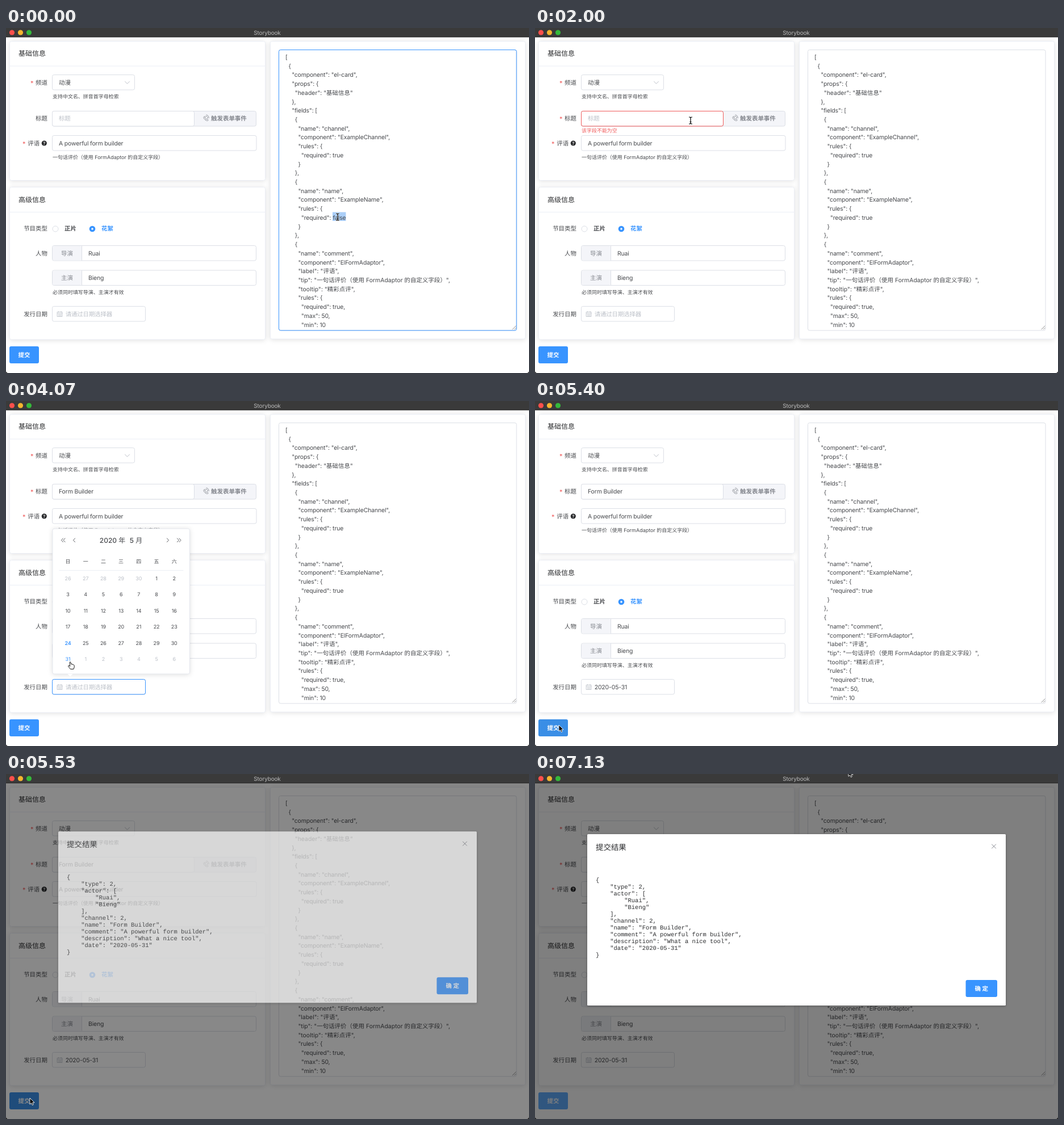
Write an HTML page that moves like this. It is 921 px wide and 608 px high and loops after 7190 ms.

```html
<!DOCTYPE html>
<html lang="zh">
<head>
<meta charset="utf-8">
<title>Storybook</title>
<style>
html, body { margin: 0; height: 100%; overflow: hidden; background: #fff; }
svg { display: block; width: 100vw; height: 100vh; }
text { font-family: Inter, "Noto Sans CJK SC", "Noto Sans CJK", sans-serif; letter-spacing: -.015em; white-space: pre; text-rendering: geometricPrecision; }
.han { letter-spacing: 0; }
.mono text { font-family: "Liberation Mono", monospace; letter-spacing: 0; }
.card { filter: drop-shadow(0 1.5px 4.5px rgba(0, 0, 0, .12)); }
.box { filter: drop-shadow(0 1px 2px rgba(0, 0, 0, .3)); }
.line { fill: none; stroke-linecap: round; stroke-linejoin: round; }
</style>
</head>
<body>
<svg id="stage" viewBox="0 0 921 608"></svg>
<script>
const LOOP = 7190;
const BLUE = '#3894ff', RED = '#f05b5b', INK = '#484a4e', DARK = '#2a2b2d',
      PALE = '#bcc0c8', MUTE = '#85888f', EDGE = '#dcdfe6', TINT = '#f4f5f9';

// Markup helpers; text is placed by its vertical middle.
const rect = (x, y, w, h, fill, stroke = 'none', r = 3, more = '') =>
  `<rect x="${x}" y="${y}" width="${w}" height="${h}" rx="${r}" fill="${fill}" stroke="${stroke}" ${more}/>`;
const text = (x, y, str, fill = INK, size = 10.48, more = '') =>
  `<text x="${x}" y="${y + size * .36}" font-size="${size}" fill="${fill}" ${/[\u4e00-\u9fff]/.test(str) ? 'class="han"' : ''} ${more}>${str}</text>`;
const path = (d, stroke, width = 1, more = '') =>
  `<path class="line" d="${d}" stroke="${stroke}" stroke-width="${width}" ${more}/>`;
const dot = (x, y, r, fill, stroke = 'none') =>
  `<circle cx="${x}" cy="${y}" r="${r}" fill="${fill}" stroke="${stroke}"/>`;
const group = (id, body) => `<g id="${id}">${body}</g>`;
const MID = ' text-anchor="middle"', END = ' text-anchor="end"', BOLD = ' font-weight="600"', MEDIUM = ' font-weight="500"';
const label = (y, str, x = 73) => text(x, y, str, INK, 10.48, END);
const star = (x, y) => text(x, y + 1, '*', RED, 11);
const hint = (y, str) => text(82, y, str, INK, 8.98);
const heading = (y, str) => text(22, y, str, DARK, 12, MEDIUM);
const card = (x, y, w, h) => rect(x, y, w, h, '#fff', '#ebeef5', 3, 'class="card"');
const input = (x, y, w, h = 26.5) => rect(x, y, w, h, '#fff', EDGE);
const ring = (id, x, y, w, h, color) => rect(x, y, w, h, 'none', color, 3, `id="${id}"`);

function titleBar() {
  return rect(0, 0, 921, 16, '#3a3a3a', 'none', 0) + rect(0, 15.4, 921, 1, '#222', 'none', 0) +
    ['#fc4f4b', '#f6b52e', '#35b93b'].map((c, i) => dot(10.5 + 15 * i, 8, 4.6, c)).join('') +
    text(460, 8.3, 'Storybook', '#b9b9b9', 10, MID);
}

function basicCard() {
  return card(6.5, 23.5, 450, 245) + path('M7 67H456', '#ebeef5') + heading(45, '基础信息') +
    star(43, 96) + label(96, '频道') + input(81.5, 82.5, 145) + text(93, 96, '动漫') +
    path('M209.5 94.2l4 4l4-4', PALE) + hint(121, '支持中文名、拼音首字母检索') +
    label(159.5, '标题') + rect(81.5, 146.5, 359, 26.5, TINT, EDGE) + input(81.5, 146.5, 250) +
    path('M349 156c-2 1-1 4 2 6c3 2 5 2 5 0l-2-2l-1.5 1l-2.5-3l1-1zM352 155c2 .5 3 2 3.2 4M353 153c3 .8 4 3 4.2 5.5', MUTE, .9) +
    text(361, 159.5, '触发表单事件', MUTE, 10.48, BOLD) +
    star(29, 203) + label(203, '评语', 59.3) + dot(67.3, 203, 4.6, DARK) +
    text(67.3, 203.2, '?', '#fff', 7.5, MID + BOLD) +
    input(81.5, 189.5, 359.5) + text(93, 203, 'A powerful form builder') +
    hint(228, '一句话评价（使用 FormAdaptor 的自定义字段）') +
    text(93, 159.5, '', INK, 10.48, 'id="name"') + group('star', star(43, 159.5)) +
    ring('nameRing', 81.5, 146.5, 250, 26.5, RED) +
    group('error', text(82, 180.5, '该字段不能为空', RED, 8.98));
}

function person(y, role, name) {
  return rect(81.5, y - 13.5, 359, 26.5, '#fff', EDGE) + rect(82, y - 13, 51, 25.5, TINT) +
    path(`M133.5 ${y - 13}v25.5`, EDGE) + text(97, y, role, MUTE) + text(145, y, name);
}

function advancedCard() {
  return card(6.5, 280.5, 450, 268.5) + path('M7 324.5H456', '#ebeef5') + heading(302.5, '高级信息') +
    label(353.5, '节目类型') + dot(87, 354, 5, '#fff', EDGE) + text(103, 353.5, '正片', INK, 10.48, BOLD) +
    dot(152, 354, 5.3, BLUE) + dot(152, 354, 1.7, '#fff') + text(168, 353.5, '花絮', BLUE, 10.48, BOLD) +
    label(397, '人物') + person(397, '导演', 'Ruai') + person(440.5, '主演', 'Bieng') +
    hint(465.5, '必须同时填写导演、主演才有效') +
    label(504, '发行日期') + input(81.5, 490.5, 164) +
    path('M90.5 500.5h8.5v8h-8.5zM90.5 503h8.5M92.5 499.5v1.5M97 499.5v1.5M92 505h5.5M92 507h5.5', PALE, .8) +
    text(104.7, 504, '', INK, 10.48, 'id="date"') + ring('dateRing', 81.5, 490.5, 164, 26.5, BLUE);
}

function codeCard() {
  const spec = [{
    component: 'el-card', props: { header: '基础信息' },
    fields: [
      { name: 'channel', component: 'ExampleChannel', rules: { required: true } },
      { name: 'name', component: 'ExampleName', rules: { required: '' } },
      { name: 'comment', component: 'ElFormAdaptor', label: '评语',
        tip: '一句话评价（使用 FormAdaptor 的自定义字段）', tooltip: '精彩点评',
        rules: { required: true, max: 50, min: 10 } }
    ]
  }];
  const lines = JSON.stringify(spec, null, 1).split('\n').slice(0, 31);
  const code = lines.map((line, i) => {
    const body = line.trimStart();
    return text(492 + 5.6 * (line.length - body.length), 51.2 + 15.72 * i, body.replace(' ""', ''));
  });
  return card(465.5, 23.5, 449, 524.5) + input(480.5, 38.5, 418.5, 494.5) +
    ring('codeRing', 480.5, 38.5, 418.5, 494.5, BLUE) +
    rect(575, 324.5, 23.5, 15.5, '#abcff8', 'none', 0, 'id="mark"') + code.join('') +
    text(575.5, 334.2, '', INK, 10.48, 'id="value"') + path('M892 531l6-6M895.5 531l2.5-2.5', '#777', .8);
}

function calendar() {
  const col = i => 109 + 31.2 * i;
  let out = rect(82, 225, 241.5, 256, '#fff', '#e4e7ed', 3, 'class="card"') +
    '<path d="M108.5 481h9l-4.5 4.5z" fill="#fff"/>' +
    path('M100.5 242l-3 3.3l3 3.3M104 242l-3 3.3l3 3.3M121.5 242l-3 3.3l3 3.3M283.5 242l3 3.3l-3 3.3M301.5 242l3 3.3l-3 3.3M305 242l3 3.3l-3 3.3', '#606266') +
    text(187.5, 245.5, '2020 年', INK, 12, MID + MEDIUM) + text(229, 245.5, '5 月', INK, 12, MID + MEDIUM) +
    path('M94 298.5H312', '#ebeef5');
  [...'日一二三四五六'].forEach((d, i) => out += text(col(i), 283, d, INK, 8.98, MID));
  for (let i = 0; i < 42; i++) {
    const n = i - 4, inside = n > 0 && n < 32, day = n < 1 ? n + 30 : inside ? n : n - 31;
    const more = MID + (n === 24 ? BOLD : '') + (n === 31 ? ' id="pick"' : '');
    out += text(col(i % 7), 312.8 + 28.45 * Math.floor(i / 7), day, n === 24 ? BLUE : inside ? INK : PALE, 8.98, more);
  }
  return out;
}

function dialog() {
  const result = { type: 2, actor: ['Ruai', 'Bieng'], channel: 2, name: 'Form Builder',
    comment: 'A powerful form builder', description: 'What a nice tool', date: '2020-05-31' };
  const lines = JSON.stringify(result, null, 4).split('\n').map((s, i) => text(107, 186 + 12 * i, s, DARK));
  return rect(92, 106, 737, 302, '#fff', 'none', 1.5, 'class="box"') + text(107, 129, '提交结果', DARK, 13.46) +
    path('M804.5 124l7 7M811.5 124l-7 7', MUTE) + `<g class="mono">${lines.join('')}</g>` +
    rect(758.5, 363, 55.5, 30, BLUE) + text(786.3, 378, '确 定', '#fff', 10.48, MID + BOLD);
}

const stage = document.getElementById('stage');
stage.innerHTML = rect(0, 0, 921, 608, '#fff', 'none', 0) +
  basicCard() + advancedCard() + codeCard() +
  rect(6, 561, 52, 30, BLUE, 'none', 3, 'id="submit"') + text(32, 576, '提交', '#fff', 10.48, MID + BOLD) +
  path('', DARK, .9, 'id="caret"') + group('calendar', calendar()) +
  rect(0, 16, 921, 592, '#000', 'none', 0, 'id="mask"') + group('dialog', dialog()) + titleBar() +
  '<path d="M0 604v4h4q-4 0-4-4M921 604v4h-4q4 0 4-4"/>' +
  group('cursor',
    group('arrow', '<path d="M0 0V11.2L2.6 8.8L4.3 12.6L6.2 11.8L4.6 8.1H8.1Z" stroke="#fff" stroke-width=".9"/>') +
    group('beam', ['#fff', '#000'].map((c, i) => path('M-2.5-6Q0-6 0-4.5Q0-6 2.5-6M0-4.5V4.5M-2.5 6Q0 6 0 4.5Q0 6 2.5 6M-1 2.5h2', c, 2.2 - i)).join('')) +
    group('hand', '<path d="M-1 .5Q0-1 1 .5L1.8 4Q3 3 4 4.3Q5.3 3.8 5.8 5Q7.3 5 7.2 6.5V9L6 12.5H.5L-3.5 7.5Q-3.5 6-2 6.5L-.3 7.5Z" fill="#fff" stroke="#000" stroke-width=".9"/>'));

const el = {};
stage.querySelectorAll('[id]').forEach(e => el[e.id] = e);
const show = (e, p) => e.setAttribute('opacity', p);
const ramp = (t, a, b) => Math.min(1, Math.max(0, (t - a) / (b - a)));
const easeOut = (p, n) => 1 - (1 - p) ** n;
const zoom = (e, p, top) => {
  show(e, p);
  e.setAttribute('transform', `translate(0 ${top * (1 - p)}) scale(1 ${p})`);
};
// Opens at a, closes at b.
const pulse = (t, a, b, len, n) => easeOut(ramp(t, a, a + len), n) - easeOut(ramp(t, b, b + len), n);

// Mouse stops: time, x, y.
const stops = [[0, 584, 333], [670, 584, 333], [1400, 274, 163], [2270, 274, 163], [2530, 424, 163],
  [2630, 424, 163], [3200, 205, 507], [3400, 205, 507], [4000, 113, 460], [4650, 113, 460], [4980, 226, 506],
  [5300, 42, 571], [6330, 42, 571], [7000, 552, -4], [7130, 552, -7], [LOOP, 552, -7]];
const fields = [[480, 38, 899, 533], [82, 146, 331, 173], [82, 190, 441, 216], [134, 384, 440, 410],
  [134, 427, 440, 454], [82, 490, 246, 517]];
const within = (x, y, [l, t, r, b]) => x >= l && x <= r && y >= t && y <= b;

function mouse(t) {
  const i = stops.findIndex(s => s[0] > t);
  const [a, x, y] = stops[i - 1], [b, u, v] = stops[i];
  const p = ramp(t, a, b), k = p * p * (3 - 2 * p);
  return [x + (u - x) * k, y + (v - y) * k];
}

function pointer(t, x, y) {
  if (t > 5350) return 'arrow';
  if (t > 3330 && t < 4300 && within(x, y, [82, 225, 323, 481])) return 'hand';
  if (within(x, y, [331, 146, 440, 173])) return 'hand';
  return fields.some(f => within(x, y, f)) ? 'beam' : 'arrow';
}

function fill(e, done, value, placeholder) {
  e.textContent = done ? value : placeholder;
  e.setAttribute('fill', done ? INK : PALE);
}

function draw(t) {
  // Code editing
  el.value.textContent = t < 130 ? 'false' : 'true'.slice(0, [200, 330, 530, 670].filter(k => t >= k).length);
  show(el.mark, t < 130 ? 1 : 0);
  show(el.codeRing, 1 - ramp(t, 1400, 1600));

  // Title field
  fill(el.name, t >= 2700, 'Form Builder', '标题');
  show(el.star, t < 670 ? 0 : 1);
  show(el.nameRing, pulse(t, 670, 2870, 200, 1));
  zoom(el.error, pulse(t, 670, 2870, 300, 4), 175);

  const caretX = 575.5 + el.value.getComputedTextLength();
  el.caret.setAttribute('d', t >= 130 && t < 1400 ? `M${caretX} 327.5v12.5` : t >= 1400 && t < 2000 ? 'M93.5 153.5v12.5' : '');

  // Date field
  fill(el.date, t >= 4130, '2020-05-31', '请通过日期选择器');
  show(el.dateRing, pulse(t, 3330, 4130, 200, 1));
  zoom(el.calendar, pulse(t, 3400, 4140, 320, 4), 225);
  el.pick.setAttribute('fill', t >= 3950 ? BLUE : INK);

  // Submission
  el.submit.setAttribute('fill', t < 5230 ? BLUE : t < 5360 ? '#60adff' : t < 5660 ? '#3a8ee6' : '#60adff');
  const open = t >= 5440 ? t - 5392 : 0, fade = easeOut(ramp(open, 0, 300), 2.3);
  show(el.mask, .5 * easeOut(ramp(open, 0, 200), 2.3));
  show(el.dialog, fade ** 1.5);
  el.dialog.setAttribute('transform', `translate(0 ${-20 * (1 - fade)})`);

  const [x, y] = mouse(t), kind = pointer(t, x, y);
  for (const k of ['arrow', 'beam', 'hand']) show(el[k], k === kind ? 1 : 0);
  show(el.cursor, t >= 130 && t < 670 ? 0 : 1);
  el.cursor.setAttribute('transform', `translate(${x} ${y})`);
}

function tick() {
  draw(performance.now() % LOOP);
  requestAnimationFrame(tick);
}
tick();
</script>
</body>
</html>
```
